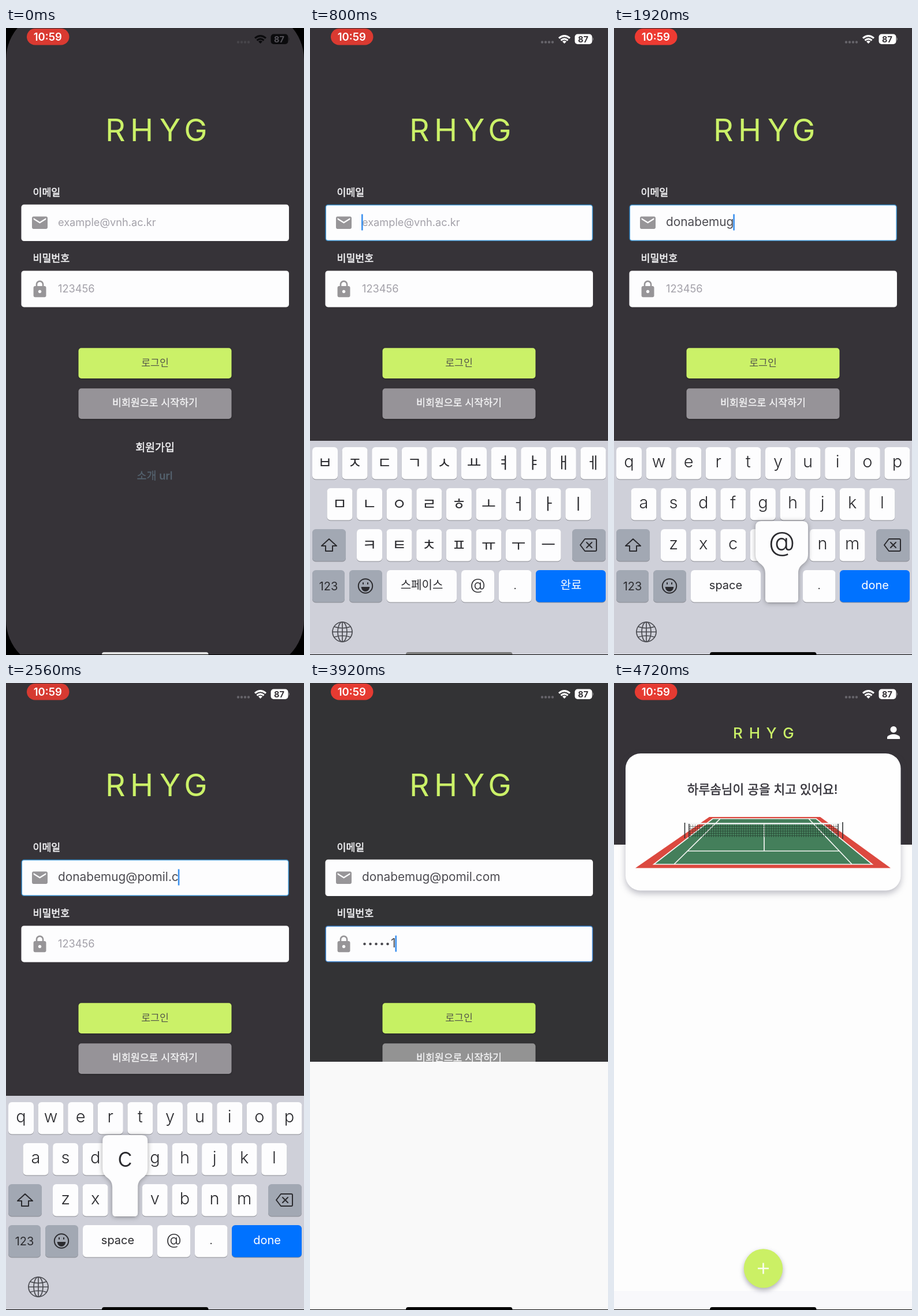
Recreate the animation shown at these times as an HTML page. Size 516 by 1086 pixels, loop 4.8 s.

```html
<!DOCTYPE html>
<html lang="ko">
<head>
<meta charset="utf-8">
<style>
html, body { margin: 0; width: 100%; height: 100%; overflow: hidden; background: #000; }
svg { display: block; width: 516px; height: 1086px; font-family: Inter, "Noto Sans CJK KR", "Noto Sans CJK", sans-serif; }
.mid { text-anchor: middle; }
.brand { fill: #cbf168; text-anchor: middle; }
.label { fill: #f4f4f6; stroke: #f4f4f6; stroke-width: .5; font-size: 17.3px; }
.hint { fill: #a3a1a9; font-size: 18.2px; }
.typed { fill: #4c4b51; font-size: 20.8px; }
.field { fill: #fdfdfe; stroke-width: 1.5; }
.lift { filter: drop-shadow(0 1px 1.5px #0004); }
.icon { fill: #979598; }
.key { fill: #fdfdfe; filter: drop-shadow(0 1.3px 0.3px #8b8c93); }
.fn { fill: #a2a8b3; }
.cap { fill: #2b2b2f; text-anchor: middle; font-weight: 300; }
.line { fill: none; stroke: #2b2b2f; stroke-width: 2; stroke-linejoin: round; stroke-linecap: round; }
.court { fill: none; stroke: #f4f6f3; stroke-width: 1.7; }
</style>
</head>
<body>
<svg viewBox="0 0 516 1086">
  <defs>
    <clipPath id="clip"><rect id="window" width="516"/></clipPath>
    <pattern id="mesh" width="4" height="4" patternUnits="userSpaceOnUse">
      <path d="M0 0H4M0 0V4" stroke="#16231c" stroke-width="1.5"/>
    </pattern>
  </defs>
  <rect width="516" height="1086"/>
  <g clip-path="url(#clip)">
    <g id="login">
      <rect id="back" width="516" height="1086"/>
      <text class="brand" x="189.5 235 284 328.5" y="196" font-size="54">RHYG</text>
      <text class="label" x="46.5" y="290.5">이메일</text>
      <rect id="mailBox" class="field" x="27.2" y="306.5" width="462" height="61.8" rx="4"/>
      <path class="icon" transform="translate(42.3 321) scale(1.35)" d="M20 4H4c-1.1 0-1.99.9-1.99 2L2 18c0 1.1.9 2 2 2h16c1.1 0 2-.9 2-2V6c0-1.1-.9-2-2-2zm0 4l-8 5-8-5V6l8 5 8-5v2z"/>
      <text id="mailHint" class="hint" x="90" y="343">example@vnh.ac.kr</text>
      <text id="mail" class="typed" x="90" y="343"></text>
      <text class="label" x="46.5" y="405">비밀번호</text>
      <rect id="passBox" class="field" x="27.2" y="421.2" width="462" height="61.5" rx="4"/>
      <path class="icon" transform="translate(42.1 436) scale(1.37)" d="M18 8h-1V6c0-2.76-2.24-5-5-5S7 3.24 7 6v2H6c-1.1 0-2 .9-2 2v10c0 1.1.9 2 2 2h12c1.1 0 2-.9 2-2V10c0-1.1-.9-2-2-2zm-6 9c-1.1 0-2-.9-2-2s.9-2 2-2 2 .9 2 2-.9 2-2 2zm3.1-9H8.9V6c0-1.71 1.39-3.1 3.1-3.1 1.71 0 3.1 1.39 3.1 3.1v2z"/>
      <text id="passHint" class="hint" x="90" y="457.5">123456</text>
      <path id="dots" stroke="#4c4b51" stroke-width="4.6" stroke-linecap="round"/>
      <text id="digit" class="typed" y="458"></text>
      <rect id="caret" width="2.6" height="28" fill="#3a90ee"/>
      <rect id="enter" class="lift" x="125.5" y="554.3" width="265" height="52.7" rx="5"/>
      <text class="mid" x="258" y="586" font-size="17.3" fill="#55584a">로그인</text>
      <rect id="guest" class="lift" x="125.5" y="624.3" width="265" height="52.7" rx="5"/>
      <text class="mid" x="258" y="655" font-size="17.3" fill="#f6f6f7" stroke="#f6f6f7" stroke-width=".3">비회원으로 시작하기</text>
      <text class="mid label" x="258" y="733" style="font-size:18.4px">회원가입</text>
      <text class="mid" x="257.5" y="782" font-size="18.4" font-weight="500" fill="#55636f" stroke="#55636f" stroke-width=".3">소개 url</text>
      <g id="board"></g>
      <g id="popup" filter="drop-shadow(0 1px 4px #0005)">
        <path id="bubble" fill="#fdfdfe"/>
        <text id="big" class="cap" font-size="47"></text>
      </g>
      <rect id="blank" y="656" width="516" height="430" fill="#f9f9f9"/>
    </g>
    <g id="home">
      <rect width="516" height="1086" fill="#fdfdfd"/>
      <rect width="516" height="280" fill="#363338"/>
      <rect y="1053" width="516" height="33" fill="#f8f8fb"/>
      <text class="brand" x="214.5 243.5 272.5 302" y="95.5" font-size="26" font-weight="500">RHYG</text>
      <path fill="#fdfdfe" transform="translate(467.5 69.5) scale(1.38)" d="M12 12c2.21 0 4-1.79 4-4s-1.79-4-4-4-4 1.79-4 4 1.79 4 4 4zm0 2c-2.67 0-8 1.34-8 4v2h16v-2c0-2.66-5.33-4-8-4z"/>
      <rect x="20" y="122" width="476.5" height="237.5" rx="26" fill="#fefefe" filter="drop-shadow(0 5px 6px #3a385055)"/>
      <text class="mid" x="257" y="191.5" font-size="21.4" fill="#333138" stroke="#333138" stroke-width=".5">하루솜님이 공을 치고 있어요!</text>
      <path fill="#dc493f" d="M165 232H357L479 320.5H37Z"/>
      <path fill="#447f5b" d="M171 235H350L447 314H69Z"/>
      <path class="court" d="M171 235H350L447 314H69ZM184 235L104 314M337 235L412 314M128 291H391M260 243V291"/>
      <rect x="130" y="245" width="258" height="22" fill="url(#mesh)" opacity=".65"/>
      <path stroke="#f2f4f5" stroke-width="2.6" d="M123 243.5H396"/>
      <path stroke="#303234" stroke-width="1.6" d="M122.5 242V269M130 244V268M388 244V268M396 241V270"/>
      <circle cx="258.5" cy="1014" r="33.7" fill="#cbf065" filter="drop-shadow(0 4px 4px #3a385066)"/>
      <path stroke="#fafdf0" stroke-width="2.6" d="M249 1014H268M258.5 1004.5V1023.5"/>
    </g>
    <rect id="pill" x="36" y="1" width="73.5" height="28.5" rx="14.2"/>
    <text class="mid" x="72.3" y="22" font-size="18.5" font-weight="600" fill="#fff">10:59</text>
    <path id="signal" stroke-width="4.4" stroke-linecap="round" d="M402 24.5h0m6 0h0m6 0h0m6 0h0"/>
    <g id="status">
      <path fill="none" stroke="currentColor" stroke-width="3.2" d="M431 17.6q9.5-8 19 0M434.5 21.4q6-5 12 0"/>
      <path fill="currentColor" d="M440.5 27l-3.5-3.5q3.5-2.8 7 0z"/>
      <rect x="458.5" y="10.5" width="30" height="17.5" rx="5" fill="currentColor"/>
      <path fill="currentColor" opacity=".5" d="M489.5 16q2.5 3 0 6.5z"/>
    </g>
    <text id="charge" class="mid" x="473" y="24.7" font-size="14.5" font-weight="700">87</text>
  </g>
  <rect id="handle" x="166" y="1081" width="184.5" height="9" rx="4"/>
  <rect y="1085" width="516" height="1"/>
</svg>
<script>
const LOOP = 4800, FOCUS = 640, LATIN = 1120, TYPE = 1200, PASS = 2880, HOME = 4560;
const email = "donabemug@pomil.com", secret = "482601", at = email.indexOf("@");
const $ = id => document.getElementById(id);
const set = (id, attrs) => { for (const k in attrs) $(id).setAttribute(k, attrs[k]); };
const show = (id, on) => set(id, { display: on ? "inline" : "none" });
const clamp = v => Math.max(0, Math.min(1, v));

// Keyboard
const keys = {};
const box = (x, y, w, kind = "", h = 55.5) =>
  `<rect class="key ${kind}" x="${x}" y="${y}" width="${w}" height="${h}" rx="6"/>`;
const cap = (s, x, y, size, extra = "") =>
  `<text class="cap" x="${x}" y="${y}" font-size="${size}" ${extra}>${s}</text>`;

function letters(rows, latin) {
  return rows.map((row, r) => [...row].map((c, i) => {
    const x = [4, 29.5, 81][r] + i * 51.6, y = 726 + 71 * r;
    keys[c] = { x, y, w: 44 };
    return box(x, y, 44) + cap(c, x + 22, y + (latin ? 35 : 37), latin ? 29 : 27);
  }).join("")).join("");
}
const wide = (space, done) =>
  cap(space, 193.5, 972, 20, 'style="font-weight:400"') +
  cap(done, 452, 972, 20, 'style="fill:#fff;font-weight:400"');

keys["@"] = { x: 262, y: 939, w: 57 };
keys["."] = { x: 327, y: 939, w: 56.5 };
$("board").innerHTML =
  '<rect y="715" width="516" height="371" fill="#cfd0d9"/>' +
  box(4, 868, 58, "fn") + box(454, 868, 58, "fn") + box(4, 939, 56, "fn") + box(68, 939, 57, "fn") +
  box(133, 939, 121) + box(262, 939, 57) + box(327, 939, 56.5) +
  '<rect class="key" style="fill:#0072ff" x="391" y="939" width="121" height="55.5" rx="6"/>' +
  cap("123", 32, 974, 20, 'style="font-weight:400"') + cap("@", 290.5, 973, 27) + cap(".", 355, 972, 22) +
  `<path class="line" d="M33 885L46 897H39V906H27V897H20ZM476 885H494q2 0 2 2V904q0 2-2 2H476L468 895.5ZM479 891l9 9m0-9l-9 9"/>
   <circle class="line" cx="96" cy="966.5" r="12.2"/>
   <path d="M88.5 968H103.5Q102 976 96 976T88.5 968Z" fill="#2b2b2f"/>
   <path class="line" stroke-width="3" d="M92 961v2m8-2v2"/>
   <g class="line" style="stroke:#4a4b51;stroke-width:1.7"><circle cx="56" cy="1046" r="17"/><ellipse cx="56" cy="1046" rx="8" ry="17"/>
   <path d="M39 1046H73M56 1029V1063M42 1037Q56 1042 70 1037M42 1055Q56 1050 70 1055"/></g>` +
  `<g id="hangul">${letters(["ㅂㅈㄷㄱㅅㅛㅕㅑㅐㅔ", "ㅁㄴㅇㄹㅎㅗㅓㅏㅣ", "ㅋㅌㅊㅍㅠㅜㅡ"])}${wide("스페이스", "완료")}</g>` +
  `<g id="latin">${letters(["qwertyuiop", "asdfghjkl", "zxcvbnm"], true)}${wide("space", "done")}</g>`;

function drawPopup(c) {
  const { x, y, w } = keys[c], l = Math.max(2, x - 17), r = Math.min(514, x + w + 17);
  const top = y - 85, end = x + w, dr = end - r, dl = l - x;
  set("bubble", { d: `M${l + 10} ${top}H${r - 10}q10 0 10 10V${y - 28}c0 20 ${dr} 14 ${dr} 34V${y + 50}q0 6-6 6H${x + 6}q-6 0-6-6V${y + 6}c0-20 ${dl}-14 ${dl}-34V${top + 10}q0-10 10-10z` });
  $("big").textContent = c;
  set("big", { x: (l + r) / 2, y: top + (c === "@" ? 52 : 55) });
}

// The symbol key is held twice as long and enters its sign on release.
const press = i => TYPE + 80 * i + (i > at ? 80 : 0);
const entered = i => press(i) + (i === at ? 80 : 0);

function draw(t) {
  const secure = t >= PASS, home = t >= HOME, focus = t >= FOCUS;

  // App window opens
  const open = clamp(t / 200), fresh = t < 160;
  set("window", { y: -30, height: 1140, rx: 85 * (1 - open) });
  set("status", { color: fresh ? "#0b0b0d" : "#fff" });
  set("signal", { stroke: fresh ? "#47454a" : "#66646a" });
  set("charge", { fill: fresh ? "#55535a" : "#363338" });
  const glow = (1 + Math.cos((t - 2900) / 800 * 2 * Math.PI)) / 2;
  set("pill", { fill: `rgb(${212 + 43 * glow},${58 + 2 * glow},${49 + 2 * glow})` });

  show("login", !home);
  show("home", home);
  set("back", { fill: secure ? "#333335" : "#363338" });
  set("guest", { fill: secure ? "#939393" : "#969398" });
  const tap = Math.sin(Math.PI * clamp((t - 4160) / 320));
  set("enter", { fill: secure ? "#c6f163" : "#cbf168", opacity: 1 - 0.3 * tap });
  set("mailBox", { stroke: focus && !secure ? "#3b8fca" : "#fdfdfe" });
  set("passBox", { stroke: secure ? "#3f86d0" : "#fdfdfe" });

  // Typing
  const chars = [...email], count = chars.filter((c, i) => t >= entered(i)).length;
  $("mail").textContent = email.slice(0, count);
  show("mailHint", !count);
  const digits = Math.max(0, Math.min(secret.length, Math.floor((t - 3120) / 160) + 1));
  const plain = digits && t < 4080 ? 1 : 0, hidden = digits - plain;
  show("passHint", !digits);
  set("dots", { d: Array.from({ length: hidden }, (_, i) => `M${94.5 + 10 * i} 452h0`).join("") });
  $("digit").textContent = plain ? secret[digits - 1] : "";
  set("digit", { x: 90 + 10 * hidden });
  show("caret", focus);
  const typed = secure
    ? 10 * hidden + (plain ? $("digit").getComputedTextLength() : 0)
    : count ? $("mail").getComputedTextLength() : 0;
  set("caret", { x: 89 + typed, y: secure ? 437.5 : 322.5 });

  // Keyboard and its pressed key
  const rise = 1 - (1 - clamp((t - FOCUS) / 120)) ** 2;
  set("board", { transform: `translate(0 ${371 * (1 - rise)})` });
  show("board", focus && !secure);
  show("hangul", t < LATIN);
  show("latin", t >= LATIN);
  const down = chars.findIndex((c, i) => t >= press(i) && t < press(i) + (i === at ? 160 : 80));
  show("popup", down >= 0);
  if (down >= 0) drawPopup(chars[down]);
  show("blank", secure);

  const grey = t < FOCUS ? 222 : t < LATIN ? 122 : 8;
  set("handle", { fill: `rgb(${grey},${grey},${grey})` });
}

function tick(now) {
  draw(now % LOOP);
  requestAnimationFrame(tick);
}
draw(0);
requestAnimationFrame(tick);
</script>
</body>
</html>
```
